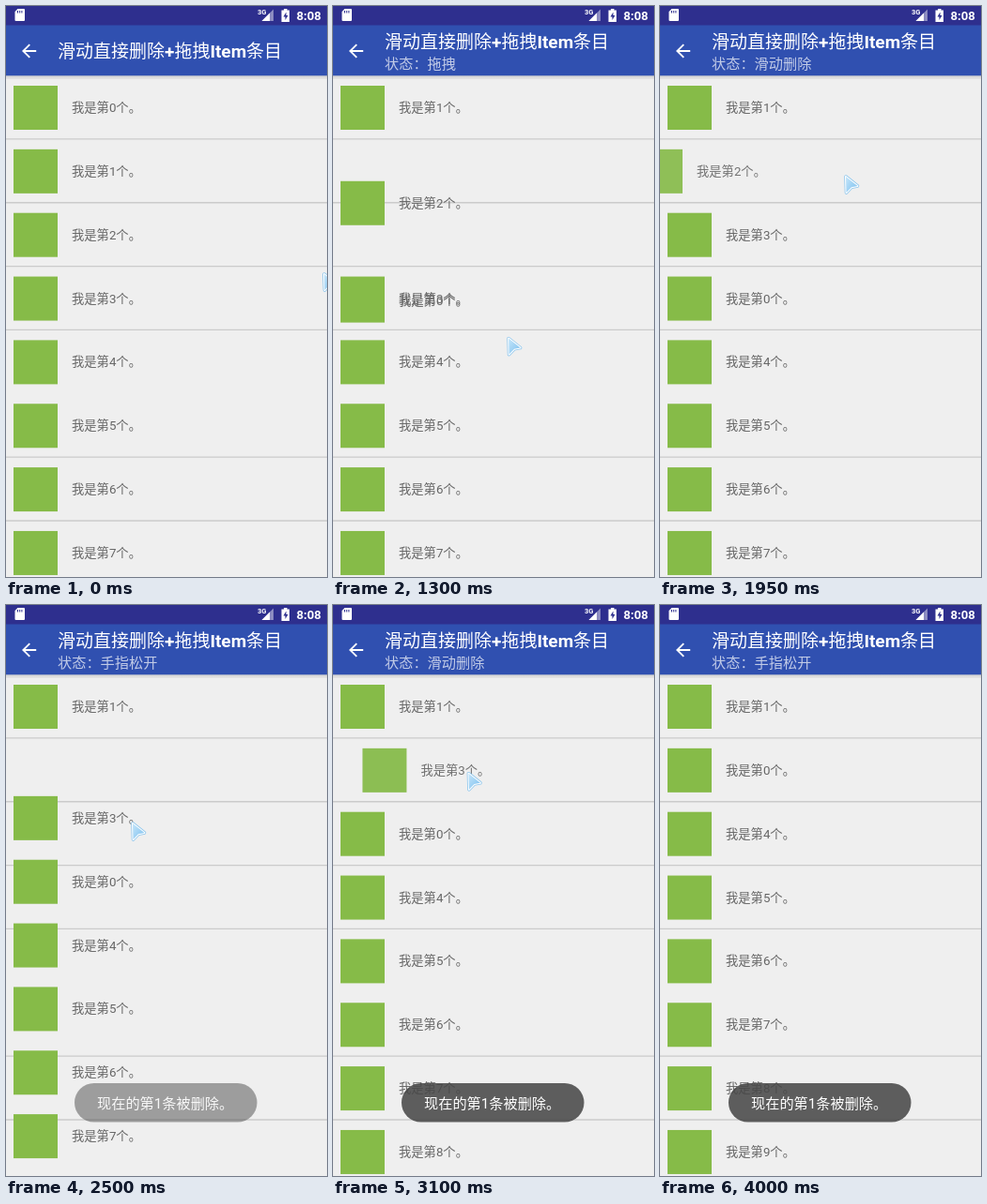
An HTML page for the animation above (4400 ms loop, 342 px wide and 609 px high).

```html
<!DOCTYPE html>
<html lang="zh-CN">
<head>
<meta charset="utf-8">
<style>
  html, body { margin: 0; width: 100%; height: 100%; overflow: hidden; background: #efefef; }
  svg { display: block; width: 342px; height: 609px; font-family: Roboto, "Noto Sans CJK SC", "Noto Sans CJK", sans-serif; }
  .row text { font-size: 13.3px; fill: #666; }
  .bold { font-weight: 700; }
</style>
</head>
<body>
<svg viewBox="0 0 342 609">
  <defs>
    <linearGradient id="glass" x2="1" y2="1">
      <stop offset="0" stop-color="#c4e5fa"/>
      <stop offset="1" stop-color="#7dc0ee"/>
    </linearGradient>
    <linearGradient id="shade" x2="0" y2="1">
      <stop offset="0" stop-color="#cfcfcf"/>
      <stop offset="1" stop-color="#e6e6e6"/>
    </linearGradient>
    <path id="arrow" d="M2 2L14.5 12 8 13.2 2.5 19z" stroke-linejoin="round"/>
  </defs>
  <rect width="342" height="609" fill="#efefef"/>
  <g id="lines" stroke="#cbcbcb" stroke-width="1.3"></g>
  <g id="list"></g>

  <rect y="74" width="342" height="4" fill="url(#shade)"/>
  <rect width="342" height="74.3" fill="#3050b0"/>
  <rect width="342" height="20.5" fill="#2e2f8e"/>

  <g fill="#fff">
    <path d="M12.5 3H19q1 0 1 1v11q0 1-1 1h-8.5q-1 0-1-1V6z"/>
    <path d="M12.5 5v2.5M14.7 5v2.5M16.9 5v2.5" stroke="#2e2f8e"/>
    <text x="268" y="9" font-size="7.5" class="bold">3G</text>
    <path d="M285 3.5V16H272.5z" opacity=".45"/>
    <path d="M281 7.5V16H272.5z"/>
    <path d="M296 3h3.5v1.5H302V17h-8.5V4.5H296z"/>
    <path d="M298.5 6.5l-3 5h2v3.5l3-5h-2z" fill="#2e2f8e"/>
    <text x="309.5" y="14.5" font-size="13.2" class="bold">8:08</text>
    <path transform="translate(13.2 36.6) scale(.95)" d="M20 11H7.83l5.59-5.59L12 4l-8 8 8 8 1.41-1.41L7.83 13H20z"/>
    <text id="title" x="55" font-size="19" font-weight="500">滑动直接删除<tspan class="bold">+</tspan>拖拽<tspan class="bold">Item</tspan>条目</text>
    <text id="status" x="55" y="67" font-size="15.2" opacity=".7"></text>
  </g>

  <g id="toast">
    <rect x="73" y="510" width="194.5" height="41.5" rx="20.75" fill="#484848" opacity=".87"/>
    <text x="97" y="536.5" font-size="15.2" fill="#fff">现在的第1条被删除。</text>
  </g>
  <g id="cursor">
    <use href="#arrow" stroke="#8fc6ec" stroke-width="3.6"/>
    <use href="#arrow" stroke="#fff" stroke-width="2"/>
    <use href="#arrow" fill="url(#glass)"/>
  </g>
</svg>
<script>
const LOOP = 4400, STEP = 50, WIDTH = 342, PITCH = 67.85, SLOP = 31;
const LIFT = 850, DROP = 1450, SWIPE1 = 1900, FREE1 = 2200, SWIPE2 = 3000, FREE2 = 3400;
const $ = id => document.getElementById(id);
const clamp = v => Math.min(1, Math.max(0, v));
const ease = v => (1 - Math.cos(Math.PI * clamp(v))) / 2;
const mix = (a, b, v) => a + (b - a) * v;
const shift = ms => ease(ms / 250);

// Cursor stops: time, x, y
const stops = [[0, 337, 284], [50, 337, 284], [300, 163, 116], [LIFT, 163, 116], [1400, 187, 373],
  [1850, 258, 182], [SWIPE1, 258, 182], [1950, 196, 180], [FREE1, 50, 188], [2500, 133, 231],
  [2950, 88, 180], [SWIPE2, 88, 180], [3320, 333, 170], [3600, 350, 157], [LOOP, 350, 157]];

function cursor(t) {
  const i = stops.findIndex(s => t < s[0]);
  const [a, ax, ay] = stops[i - 1], [b, bx, by] = stops[i];
  const v = ease((t - a) / (b - a));
  return { x: mix(ax, bx, v), y: mix(ay, by, v) };
}

// The row trails the cursor, then settles three slots down
function drag(t) {
  const held = Math.max(0, cursor(Math.min(Math.max(t, LIFT), DROP)).y - cursor(LIFT).y - SLOP);
  return mix(held, 3 * PITCH, ease((t - DROP) / 150));
}

// The row trails the cursor, then flies out on that side
function swipe(t, from, free, side) {
  const moved = side * (cursor(Math.min(Math.max(t, from), free)).x - cursor(from).x);
  return side * mix(Math.max(0, moved - SLOP), WIDTH, ease((t - free) / 200));
}

function rowY(n, t) {
  const gap1 = shift(t - 2417);
  // The second gap starts to close, stalls, then goes on
  const gap2 = shift(t < 3850 ? Math.min(33, t - 3600) : t - 3750);
  if (n === 0) return drag(t) - (gap1 + gap2) * PITCH;
  const passed = n <= 3 ? shift(t - 925 - 125 * n) : gap2;
  return (n - passed - (n > 2 ? gap1 : 0)) * PITCH;
}

function statusAt(t) {
  if (t < LIFT) return "";
  if (t < DROP) return "拖拽";
  const swiping = t > SWIPE1 && t < FREE1 || t > SWIPE2 && t < FREE2;
  return swiping ? "滑动删除" : "手指松开";
}

$("lines").innerHTML = [0, 1, 2, 3, 5, 6]
  .map(i => `<path d="M0 ${141.9 + i * PITCH}h${WIDTH}"/>`).join("");

// The dragged row comes last so that it lies on top
const order = [1, 2, 3, 4, 5, 6, 7, 8, 9, 0];
$("list").innerHTML = order.map(n => `<g class="row" id="row${n}">
  ${n ? "" : '<rect id="press" y="76" width="342" height="65" fill="#dfdfdf"/>'}
  <rect x="8" y="85" width="47" height="47" fill="#86bb48"/>
  <text x="70" y="113">我是第${n}个。</text></g>`).join("");

function draw(t) {
  for (const n of order) {
    const x = n === 2 ? swipe(t, SWIPE1, FREE1, -1) : n === 3 ? swipe(t, SWIPE2, FREE2, 1) : 0;
    $("row" + n).setAttribute("transform", `translate(${x} ${rowY(n, t)})`);
    $("row" + n).setAttribute("opacity", 1 - Math.abs(x) / WIDTH);
  }
  const status = statusAt(t), { x, y } = cursor(t);
  $("title").setAttribute("y", status ? 45 : 55);
  $("status").textContent = status && "状态：" + status;
  $("press").setAttribute("opacity", clamp(Math.min((t - 350) / 100, (1050 - t) / 200)));
  $("toast").setAttribute("opacity", clamp((t - 2400) / 180));
  $("cursor").setAttribute("transform", `translate(${x} ${y})`);
}

const start = performance.now();
function tick() {
  const t = (performance.now() - start) % LOOP;
  draw(Math.floor(t / STEP) * STEP);
  requestAnimationFrame(tick);
}
tick();
</script>
</body>
</html>
```
